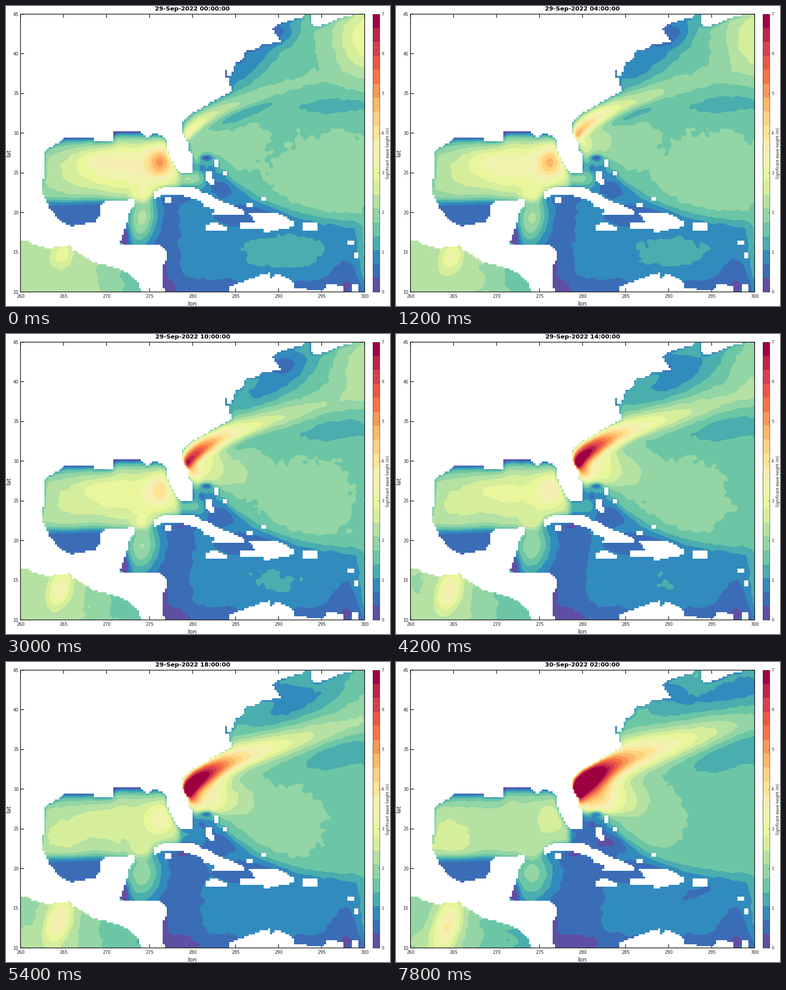
A matplotlib script that plays this animation: 848x661 px, repeating every 8 s.

```python
import numpy as np
import matplotlib.pyplot as plt
from matplotlib.animation import FuncAnimation
from matplotlib.colors import to_rgb
from matplotlib.path import Path
from matplotlib.patches import Rectangle

W, H, DPI = 848, 661, 64
LEFT, RIGHT, TOP, BOTTOM = 32, 792, 18, 630
NX, NY = RIGHT - LEFT, BOTTOM - TOP
INK = "#1c1c1c"
LAST_HOUR = 26

PALETTE = """5e4fa2 3b6db7 328bbd 4aadae 6cc6a5 93d5a4 b5e1a2 d5ee9b e9f69b f0f3ad
f5eeb0 fee394 fed27f fdb768 fb9754 f57445 eb5846 d7404e be234a 9e0142""".split()
RGB = np.array([to_rgb("#" + c) for c in PALETTE])

# Coastlines as key points, in stage pixels
PACIFIC_COAST = [
    (32, 18), (32, 517), (50, 518), (63, 526), (100, 535), (106, 530), (124, 530),
    (143, 526), (145, 535), (176, 553), (194, 565), (215, 569), (268, 586), (293, 608),
    (298, 632), (349, 632), (345, 600), (345, 574), (354, 560), (355, 538), (335, 524)]
GULF_COAST = [
    (251, 524), (257, 503), (266, 480), (274, 447), (284, 440), (284, 426), (220, 429),
    (208, 442), (207, 462), (195, 476), (143, 485), (118, 472), (95, 443), (80, 410),
    (80, 385), (84, 372), (84, 320), (114, 302), (131, 290), (193, 290), (196, 299),
    (236, 298), (237, 277), (298, 277), (310, 290), (322, 282), (337, 282), (352, 292),
    (357, 320), (370, 350), (383, 367), (411, 367)]
EAST_COAST = [
    (412, 330), (402, 313), (401, 300), (388, 275), (390, 255), (407, 238), (465, 205),
    (496, 188), (498, 175), (492, 172), (494, 162), (484, 155), (484, 141), (489, 141),
    (489, 153), (497, 153), (508, 124), (521, 120), (531, 97), (551, 95), (566, 83),
    (604, 80), (605, 74), (589, 52), (596, 42), (626, 31), (655, 24), (662, 18)]
NORTH_CAPE = [(674, 18), (674, 38), (680, 44), (694, 47), (699, 42), (736, 27), (770, 18)]
BIG_ISLAND = [
    (326, 424), (326, 408), (350, 399), (416, 398), (428, 408), (452, 415), (464, 424),
    (525, 450), (526, 459), (456, 459), (459, 447), (436, 440), (432, 431), (404, 421),
    (388, 416), (345, 415)]
EAST_ISLAND = [
    (517, 478), (549, 475), (537, 456), (600, 455), (634, 474), (635, 486), (570, 499),
    (568, 489), (517, 489)]
SOUTH_COAST = [
    (491, 632), (492, 618), (562, 592), (583, 587), (586, 600), (594, 592), (605, 592),
    (634, 607), (635, 620), (697, 627), (712, 611), (745, 618), (746, 632)]
SMALL_ISLANDS = [
    [(441, 482), (460, 477), (488, 486), (488, 495), (441, 495)],
    [(441, 364), (454, 364), (459, 394), (449, 394), (441, 380)]]
# Island cells: left, top, right, bottom
BLOCKS = [(350, 420, 365, 433), (653, 477, 687, 495), (459, 337, 469, 355),
          (478, 363, 488, 372), (563, 420, 574, 429), (530, 433, 545, 442),
          (754, 516, 768, 525), (768, 542, 777, 556), (763, 612, 778, 632)]


def land_mask():
    """Land on quarter-degree cells, spread out to stage pixels."""
    cols, rows = 160, 140
    cx = LEFT + (np.arange(cols) + .5) * NX / cols
    cy = TOP + (np.arange(rows) + .5) * NY / rows
    gx, gy = np.meshgrid(cx, cy)
    cells = np.column_stack([gx.ravel(), gy.ravel()])
    shapes = [PACIFIC_COAST + GULF_COAST + EAST_COAST, NORTH_CAPE, BIG_ISLAND,
              EAST_ISLAND, SOUTH_COAST, *SMALL_ISLANDS]
    land = np.zeros(len(cells), bool)
    for shape in shapes:
        land |= Path(shape + shape[:1]).contains_points(cells)
    land = land.reshape(rows, cols)
    for x0, y0, x1, y1 in BLOCKS:
        land |= (gx > x0) & (gx < x1) & (gy > y0) & (gy < y1)
    ix = np.arange(NX) * cols // NX
    iy = np.arange(NY) * rows // NY
    return land[iy][:, ix]


def blur(a, sigma):
    n = int(3 * sigma)
    k = np.exp(-.5 * (np.arange(-n, n + 1) / sigma) ** 2)
    k /= k.sum()
    for axis in (0, 1):
        pad = [(n, n) if i == axis else (0, 0) for i in (0, 1)]
        padded = np.pad(a, pad, mode="edge")
        a = np.apply_along_axis(np.convolve, axis, padded, k, "valid")
    return a


def step_up(d):
    return 1 / (1 + np.exp(-np.clip(d, -40, 40)))


def lerp(a, b, s):
    return a + (b - a) * s


def swell(s, x, y, long, wide, height, turn=0):
    """Gaussian hump; any argument may be a (start, end) pair over the loop."""
    args = (x, y, long, wide, height, turn)
    x, y, long, wide, height, turn = (
        lerp(*v, s) if isinstance(v, tuple) else v for v in args)
    c, n = np.cos(np.radians(turn)), np.sin(np.radians(turn))
    u = ((X - x) * c + (Y - y) * n) / long
    v = ((Y - y) * c - (X - x) * n) / wide
    return height * np.exp(-.5 * (u * u + v * v))


# Wave height of each basin in colour bands; s runs from 0 to 1 over the loop

def gulf(s):
    f = lerp(5, 6.2, s)
    f += swell(s, 265, 352, 100, 45, (5.2, .3))
    f += swell(s, 342, 342, 22, 28, (5.6, 1.4))
    f += swell(s, 208, 338, 24, 12, (1.2, 0))
    f += swell(s, 115, 395, 42, 45, (.3, 1.3))
    f += swell(s, 117, 468, 12, 10, 1.2)
    f += swell(s, 197, 458, 22, 20, -2.8)
    f += swell(s, 300, 432, 18, 22, (3.4, 1))
    coast = 290 - 12 * step_up((X - 237) / 4)
    shelf = np.exp(-np.clip(Y - coast + 1, 0, None) / 13)
    return f * (1 - .85 * shelf)


def stream(s):
    """Ridge that builds along the current, steep to the north at first."""
    grow = np.sin(np.pi / 2 * s)
    crest_y = 204 - .29 * (X - 540) + 36 * np.exp(-(X - 405) / 45)
    crest = lerp(4.4, 16.8, grow) * np.exp(-(X - 410) / lerp(110, 170, s))
    width = np.where(Y < crest_y, lerp(16, 30, s), lerp(11, 22, s))
    return crest * np.exp(-.5 * ((Y - crest_y) / width) ** 2)


def atlantic(s):
    f = lerp(4.6, 4.4, s) + stream(s)
    f += swell(s, 440, 295, 45, 42, (.8, 8)) * step_up((338 - Y) / 5)
    f += swell(s, 416, 306, 12, 13, 4 * np.sin(np.pi * s))
    f += swell(s, 418, 345, 10, 14, (3.2, -1))
    f += swell(s, 800, 70, 55, 60, (4.2, -1))
    f += swell(s, (540, 690), (110, 80), 92, 28, (-2.5, -1.5), (-48, -15))
    f += swell(s, 608, 58, 26, 20, -1.4)
    f += swell(s, 735, (220, 197), 72, (18, 26), -1.2, (-4, -22))
    f += swell(s, 525, 238, 50, 9, (-1.5, 0), -22)
    f += swell(s, 530, 310, 40, 24, (.8, 1), -60)
    f += swell(s, (720, 580), (380, 340), (100, 55), 75, 1.1)
    return f


def caribbean(s):
    f = 2.4 - step_up((lerp(378, 450, s) - X) / 12)
    f += swell(s, 300, 468, 42, (22, 34), (5, 4), 100)
    f += swell(s, 260, 510, 9, 18, -3)
    f += swell(s, (615, 570), 540, (85, 55), 35, (1.1, .2))
    f += swell(s, 750, 592, 28, 36, -.9)
    f += swell(s, 535, 464, 50, 16, -1.4)
    f += swell(s, 372, 420, 25, 9, -1.1)
    f += swell(s, 350, 570, 30, 6, -.7, 90)
    f += swell(s, 660, 510, 45, 10, (0, -.6), -25)
    f += swell(s, 478, 395, 32, 20, (-.9, -1.5))
    f += swell(s, 400, 380, 32, 15, (3.8, .5))
    f += swell(s, 805, 540, 16, 80, (2.8, 1.8))
    return f - .9 * step_up((Y - 602) / 8)


def pacific(s):
    grow = np.sin(np.pi / 2 * s)
    f = lerp(6.6, 6.2, s) - 2.4 * step_up((X - lerp(235, 190, s)) / 28)
    f += swell(s, 40, 550, 30, 30, (0, -.8))
    f += swell(s, (124, 113), (548, 580), (20, 40), (15, 19), lerp(2.2, 5.2, grow), 108)
    return f


X, Y = np.meshgrid(LEFT + np.arange(NX, dtype=np.float32) + .5,
                   TOP + np.arange(NY, dtype=np.float32) + .5)
LAND = land_mask()
SHORE = 1 - .65 * blur(LAND.astype(float), 4) * (Y < 400)
RIPPLE = blur(np.random.default_rng(4).normal(size=(NY, NX)), 5)
RIPPLE *= .06 / RIPPLE.std()

# Soft borders between the basins
IN_GULF = step_up((384 - X) / 3) * step_up((430 - 18 * step_up((X - 322) / 4) - Y) / 5)
BANKS = 340 + 150 * (1 - np.exp(-(np.maximum(X, 450) - 450) / 130))
IN_ATLANTIC = step_up((BANKS - Y) / 8)
IN_PACIFIC = (X < 300) & (Y > 515) & (Y - 515 > (X - 240) * .5)


def sea_image(hour):
    s = hour / LAST_HOUR
    bands = lerp(caribbean(s), atlantic(s), IN_ATLANTIC)
    bands = lerp(bands, gulf(s), IN_GULF)
    bands = np.where(IN_PACIFIC, pacific(s), bands)
    bands = bands * SHORE + RIPPLE
    bands += swell(s, 442, 334, 9, 4, -3.6) + swell(s, 433, 358, 4, 5, -1.5)
    image = np.zeros((NY, NX, 4), np.uint8)
    image[..., :3] = (RGB * 255).round().astype(np.uint8)[np.clip(bands, 0, 19.9).astype(int)]
    image[..., 3] = np.where(LAND, 0, 255)
    return image


def title_text(hour):
    return f"{29 + hour // 24}-Sep-2022 {hour % 24:02d}:00:00"


plt.rcParams["font.family"] = "DejaVu Sans"
fig = plt.figure(figsize=(W / DPI, H / DPI), dpi=DPI, facecolor="white")
ax = fig.add_axes([0, 0, 1, 1])
ax.axis("off")


def px(size):
    return size * 72 / DPI


def label(x, y, s, size, **kw):
    kw = {"ha": "center", "va": "center", "color": INK, **kw}
    return ax.text(x, y, s, fontsize=px(size), **kw)


def line(xs, ys, width, z=1):
    ax.plot(xs, ys, color=INK, lw=px(width), solid_capstyle="butt", zorder=z)


IMAGES = [sea_image(hour) for hour in range(0, LAST_HOUR + 1, 2)]
sea = ax.imshow(IMAGES[0], extent=(LEFT, RIGHT, BOTTOM, TOP),
                interpolation="nearest", aspect="auto", zorder=2)
title = label(412, 10, title_text(0), 13.2, weight="bold", va="baseline", color="black")

ax.add_patch(Rectangle((LEFT, TOP), NX, NY, fill=False, ec=INK, lw=px(1.6), zorder=3))
for lon in range(260, 301, 5):
    x = LEFT + (lon - 260) * NX / 40
    line([x, x], [BOTTOM, BOTTOM - 8], 1.5)
    line([x, x], [TOP, TOP + 8], 1.5)
    label(x, 640, str(lon), 9.5)
for lat in range(10, 46, 5):
    y = BOTTOM - (lat - 10) * NY / 35
    line([LEFT, LEFT + 8], [y, y], 1.5)
    line([RIGHT, RIGHT - 8], [y, y], 1.5)
    label(28, y + .5, str(lat), 9.5, ha="right")
label(412, 656, "lon", 13)
label(6, 324, "lat", 13, rotation=90)

step = NY / len(RGB)
for k, color in enumerate(RGB):
    ax.add_patch(Rectangle((810, BOTTOM - (k + 1) * step), 15, step, fc=color, lw=0,
                           antialiased=False))
ax.add_patch(Rectangle((810, TOP), 15, NY, fill=False, ec=INK, lw=px(.7), zorder=3))
for k in range(8):
    y = BOTTOM - k * NY / 7
    line([822, 825], [y, y], .7, z=3)
    label(829, y + .5, str(k), 8.8, ha="left")
label(843, 324, "Significant wave height (m)", 8.1, rotation=90)

ax.set_xlim(0, W)
ax.set_ylim(H, 0)


def update(i):
    k = i // 3
    sea.set_data(IMAGES[k])
    title.set_text(title_text(2 * k))
    return sea, title


anim = FuncAnimation(fig, update, frames=40, interval=200, repeat=True, repeat_delay=0)
plt.show()
```
